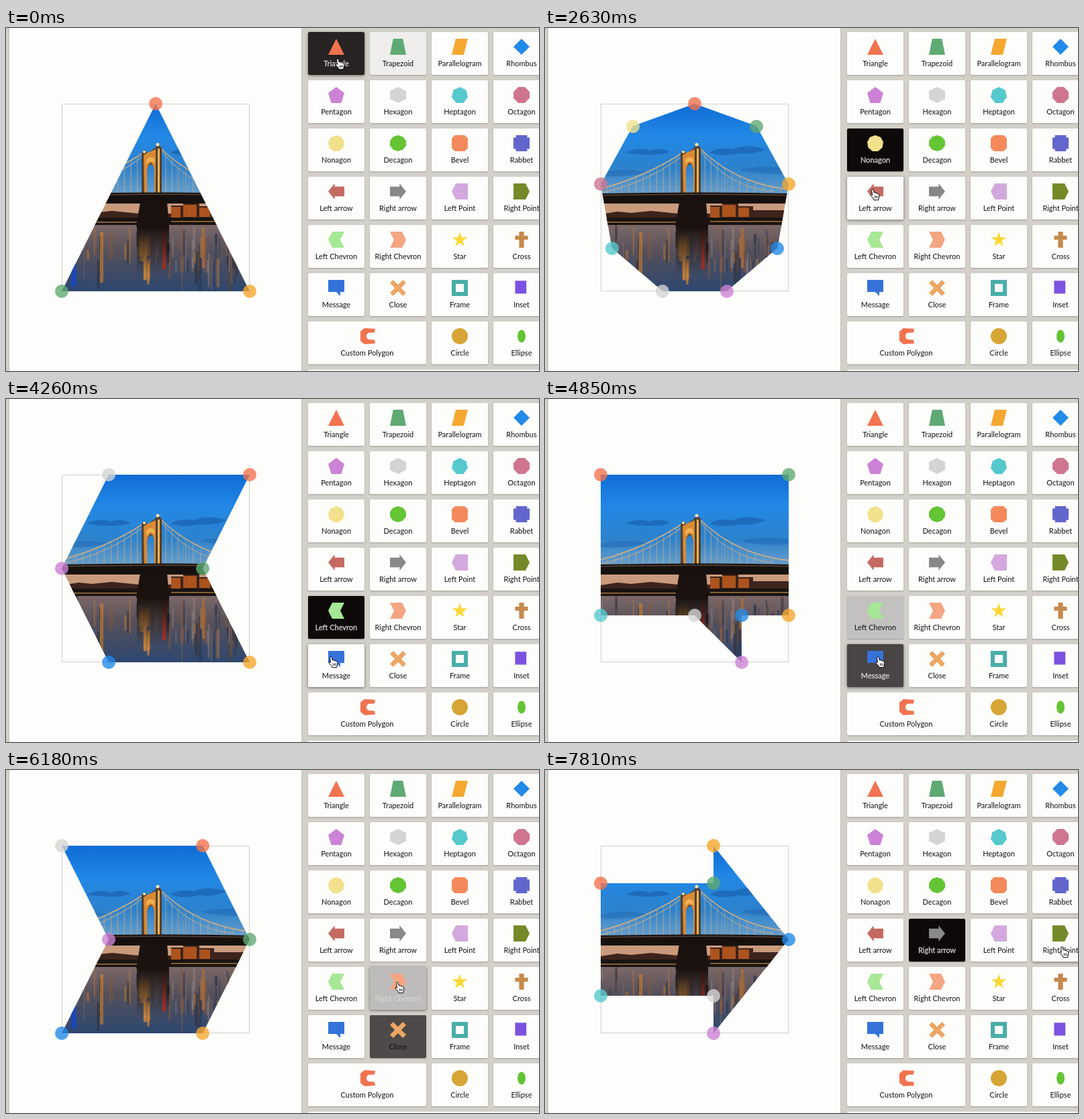
An HTML page for the animation above (8 s loop, 794x512 px).

```html
<!DOCTYPE html>
<html lang="en">
<head>
<meta charset="utf-8">
<title>Shape picker</title>
<style>
  html, body { margin: 0; width: 100%; height: 100%; overflow: hidden; background: #d3d0c9; }
  body { position: relative; font: 11px/16px Lato, "Open Sans", sans-serif; color: #111; }
  body > * { position: absolute; box-sizing: border-box; }
  #panel { left: 5px; top: 0; width: 435px; height: 100%; background: #fdfdfb; box-shadow: 0 0 2px rgba(0,0,0,.2); }
  #frame { left: 83px; top: 113px; width: 280px; height: 280px; border: 1px solid #d0d0c9; }
  #photo { left: 83px; top: 113px; width: 280px; height: 280px; }
  .handle { width: 20px; height: 20px; margin: -10px; border-radius: 50%; opacity: .8; }
  .card { width: 84px; height: 64px; border-radius: 2px; text-align: center; background: #fdfdfc; box-shadow: 0 1px 2px rgba(0,0,0,.25); }
  .card.hover { box-shadow: 0 1px 4px rgba(0,0,0,.5); }
  .card.on { color: #d6d2d0; -webkit-text-stroke: .3px #d6d2d0; }
  .card i { display: block; width: 24px; height: 24px; margin: 10px auto 5px; }
  #hand { width: 15px; height: 18px; margin: -9px 0 0 -7px; }
</style>
</head>
<body>
<div id="panel"></div>
<div id="frame"></div>
<svg id="photo" viewBox="83 113 280 280">
  <defs>
    <linearGradient id="sky" x2="0" y2="1">
      <stop stop-color="#0f6cd4"/><stop offset=".35" stop-color="#2288e6"/>
      <stop offset=".7" stop-color="#2c82cc"/><stop offset="1" stop-color="#6a9fca"/>
    </linearGradient>
    <linearGradient id="water" x2="0" y2="1">
      <stop stop-color="#7c6868"/><stop offset=".4" stop-color="#55505a"/><stop offset="1" stop-color="#2d4770"/>
    </linearGradient>
    <linearGradient id="shade" x2="0" y2="1">
      <stop stop-color="#17110f"/><stop offset="1" stop-color="#17110f" stop-opacity="0"/>
    </linearGradient>
  </defs>
  <path fill="url(#sky)" d="M83 113h280v137H83z"/>
  <g fill="#1b62ae" opacity=".7">
    <path d="M120 186q20-9 36-3 16-6 30 2-20 8-66 1zM245 186q14-9 34-5 22-9 50 0-20 9-40 6-25 6-44-1z"/>
    <path d="M83 216q30-8 70-1-30 9-70 6zM290 212q30-8 73-3v8q-40 3-73-5z" opacity=".6"/>
  </g>
  <path fill="#c99a7c" d="M83 258h280v26H83z"/>
  <path fill="#3c241c" d="M83 278l25-4 20 2 30-3 40 4h48v-12h18v-3h24v4h22v6h53v24H83z"/>
  <path fill="#c8601f" d="M246 267h14v16h-14zM264 264h20v18h-20zM288 268h16v14h-16z" opacity=".8"/>
  <path fill="#1a1412" d="M83 283h280v11H83z"/>
  <path fill="#e0a050" d="M83 289h112v1.5H83zM246 288h117v1.5H246z" opacity=".7"/>
  <path fill="url(#water)" d="M83 294h280v99H83z"/>
  <g id="streaks"></g>
  <path fill="url(#shade)" d="M195 294h48v75h-48z"/>
  <g id="cables" fill="none" stroke="#e0b27c"></g>
  <path fill="#54402f" d="M202 187l4-5 5 5 11-8 4-6 6 6v72h-11v-40q-4-16-11 0v40h-8z"/>
  <path fill="#d98a34" d="M205 190l4-3 14-6v68h-2v-38q-5-20-11 0v38h-4z"/>
  <path fill="#f0b252" d="M209 197q6-8 12-1v6q-6-7-12 2zM226 180h3v66h-3z"/>
  <g fill="#ffe6a8"><circle cx="206" cy="185" r="2"/><circle cx="226" cy="174" r="2.5"/></g>
  <path fill="#16110f" d="M83 247q140-3 280 0v15H83z"/>
  <path fill="#5c4436" d="M83 249q140-3 280 0v1.5q-140-3-280 0z"/>
  <path fill="#1b1210" d="M200 260h40l3 36-6 4h-36l-7-4z"/>
</svg>
<svg id="hand" viewBox="0 0 15 18">
  <path fill="#fff" stroke="#000" stroke-linejoin="round" d="M3.5 9.5L2.6 2.6Q2.7.8 4 .8 5.2.8 5.5 2.4L6.3 6Q7 5 8.2 5.5 8.9 5.8 9 6.6 10 5.8 11 6.6 11.5 7 11.6 7.6 13 7 13.6 8.4 14.2 11 13.4 13L12.6 16.8H6Q5.6 14.8 3.6 13 1.6 11 .8 9.4.8 8 2 8.2z"/>
  <path fill="none" stroke="#000" stroke-width=".8" d="M7.3 10.5v3.6M9.2 10.5v3.6M11.1 10.5v3.6"/>
</svg>
<script>
const $ = id => document.getElementById(id);
const hand = $('hand'), photo = $('photo');

// Shapes are lists of [x, y] in percent of their box.
const pts = s => s.split(',').map(p => p.split(' ').map(Number));
const regular = n => Array.from({ length: n }, (_, i) => {
  const a = i / n * 2 * Math.PI, at = k => k / n * 2 * Math.PI;
  const wide = Math.max(...Array.from({ length: n }, (_, k) => Math.sin(at(k))));
  const low = Math.cos(at(Math.floor(n / 2)));
  return [50 + 50 * Math.sin(a) / wide, 100 * (1 - Math.cos(a)) / (1 - low)].map(Math.round);
});
const spin = s => {
  const out = [];
  let quarter = pts(s);
  for (let i = 0; i < 4; i++) {
    out.push(...quarter);
    quarter = quarter.map(([x, y]) => [y, 100 - x]);
  }
  return out;
};
const fold = (s, axis) => {
  const half = pts(s);
  const rest = half.filter(p => p[axis] !== 50).reverse();
  return half.concat(rest.map(p => p.map((v, i) => i === axis ? 100 - v : v)));
};

const items = [
  ['Triangle', '#f27350', fold('50 0,0 100', 0)],
  ['Trapezoid', '#5fa973', fold('20 0,0 100', 0)],
  ['Parallelogram', '#f5a830', pts('25 0,100 0,75 100,0 100')],
  ['Rhombus', '#228ae9', spin('50 0')],
  ['Pentagon', '#cc82d6', regular(5)],
  ['Hexagon', '#d4d4d4', regular(6)],
  ['Heptagon', '#55c9ce', regular(7)],
  ['Octagon', '#cf7590', spin('70 0,30 0')],
  ['Nonagon', '#f2e18c', regular(9)],
  ['Decagon', '#63c434', regular(10)],
  ['Bevel', '#f48a5b', spin('80 0,20 0')],
  ['Rabbet', '#6266cc', spin('85 0,15 0,15 15')],
  ['Left arrow', '#c46a62', pts('40 0,40 20,100 20,100 80,40 80,40 100,0 50')],
  ['Right arrow', '#888886', fold('0 20,60 20,60 0,100 50', 1)],
  ['Left Point', '#d3a8de', fold('0 50,25 0,100 0', 1)],
  ['Right Point', '#748a28', fold('0 0,75 0,100 50', 1)],
  ['Left Chevron', '#a6e895', pts('100 0,75 50,100 100,25 100,0 50,25 0')],
  ['Right Chevron', '#f4a582', pts('75 0,100 50,75 100,0 100,25 50,0 0')],
  ['Star', '#fdd835', fold('50 0,39 35,2 35,32 57,21 91,50 70', 0)],
  ['Cross', '#c68a4c', fold('35 0,35 25,10 25,10 50,35 50,35 100', 0)],
  ['Message', '#3573d8', pts('0 0,100 0,100 75,75 75,75 100,50 75,0 75')],
  ['Close', '#eca664', spin('20 0,0 20,30 50')],
  ['Frame', '#4aaea8', pts('0 0,0 100,25 100,25 25,75 25,75 75,25 75,25 100,100 100,100 0')],
  ['Inset', '#7c52e0', 'inset(5% 20% 15% 10%)'],
  ['Custom Polygon', '#f27350', fold('8 21,33 0,100 4,96 27,58 29,46 42', 1)],
  ['Circle', '#d6a535', 'circle(50%)'],
  ['Ellipse', '#63c434', 'ellipse(25% 40%)'],
  ['', 'none', 'none']
];
const clip = s => typeof s === 'string' ? s : `polygon(${s.map(([x, y]) => `${x}% ${y}%`)})`;

function add(cls, left, top) {
  const el = document.createElement('div');
  el.className = cls;
  el.style.left = left + 'px';
  el.style.top = top + 'px';
  document.body.insertBefore(el, hand);
  return el;
}

const cards = items.map(([name, color, shape], i) => {
  const slot = i > 24 ? i + 1 : i;
  const x = 450 + slot % 4 * 92, y = 6 + Math.floor(slot / 4) * 72;
  const el = add('card', x, y);
  const w = i === 24 ? 176 : i === 27 ? 360 : 84;
  el.style.width = w + 'px';
  el.innerHTML = `<i style="background:${color};clip-path:${clip(shape)}"></i>${name}`;
  return { el, x, y, w };
});
const handles = items.slice(0, 12).map(item => {
  const el = add('handle', 0, 0);
  el.style.background = item[1];
  return el;
});

// Bridge cables with hangers, then lights mirrored in the water.
function cable(x0, y0, cx, cy, x1, y1, alpha) {
  let d = `M${x0} ${y0}Q${cx} ${cy} ${x1} ${y1}`, hang = '';
  for (let u = .08; u < 1; u += .085) {
    const v = 1 - u, at = (a, b, c) => v * v * a + 2 * u * v * b + u * u * c;
    hang += `M${at(x0, cx, x1)} ${at(y0, cy, y1)}V247`;
  }
  return `<g opacity="${alpha}"><path stroke-width="1.6" d="${d}"/><path stroke-width=".8" opacity=".7" d="${hang}"/></g>`;
}
$('cables').innerHTML = cable(205, 186, 150, 222, 83, 240, .9) + cable(203, 192, 150, 232, 83, 246, .5)
  + cable(229, 178, 282, 232, 363, 241, .9) + cable(232, 184, 275, 238, 340, 244, .5);

let seed = 7;
const rnd = () => (seed = seed * 16807 % 2147483647) / 2147483647;
const streak = (x, y, w, h, color, alpha) =>
  `<rect x="${x}" y="${y}" width="${w}" height="${h}" fill="${color}" opacity="${alpha}"/>`;
const tones = ['#c07a38', '#2b2423', '#8a5a3c', '#24304a', '#9a8580'];
let lights = '';
for (let i = 0; i < 90; i++)
  lights += streak(83 + rnd() * 280, 294 + rnd() * 55, 1 + rnd() * 4, 12 + rnd() * 45, tones[i % 5], .45);
for (let i = 0; i < 14; i++)
  lights += streak(198 + rnd() * 14, 305 + rnd() * 50, 2 + rnd() * 4, 30, '#d88a30', .5);
lights += streak(233, 300, 5, 60, '#d8281c', .8) + streak(97, 352, 8, 34, '#1648c8', .8)
  + streak(140, 305, 5, 75, '#cf8434', .6) + streak(292, 298, 4, 60, '#c87a30', .6);
$('streaks').innerHTML = lights;

// Each cue: chosen card, fade already done (ms), then the pointer's steps to its next stop.
const STEP = 146, FADE = 300, LOOP = 8000;
const cues = [
  { t: 0, card: 0, lead: 282, n: 1, to: [497, 54] },
  { t: 424, card: 0, lead: 300, n: 4, to: [498, 109], via: [610, 70] },
  { t: 1300, card: 4, lead: 180, n: 4, to: [492, 180] },
  { t: 2180, card: 8, lead: 80, n: 3, to: [491, 249] },
  { t: 2920, card: 12, lead: 80, n: 3, to: [489, 322] },
  { t: 3810, card: 16, lead: 80, n: 3, to: [487, 393] },
  { t: 4560, card: 20, lead: 80, n: 4, to: [564, 396] },
  { t: 5450, card: 21, lead: 0, n: 3, to: [586, 325] },
  { t: 6180, card: 17, lead: 80, n: 3, to: [597, 268] },
  { t: 6920, card: 13, lead: 80, n: 6, to: [773, 272], via: [720, 640] }
];

function showShape(shape) {
  photo.style.clipPath = clip(shape);
  handles.forEach((el, i) => {
    const p = shape[i];
    el.style.display = p ? '' : 'none';
    if (!p) return;
    el.style.left = 83 + p[0] * 2.8 + 'px';
    el.style.top = 113 + p[1] * 2.8 + 'px';
  });
}

function draw(now) {
  const t = now % LOOP;
  const at = cues.findLastIndex(c => c.t <= t);
  const cue = cues[at], from = at ? cues[at - 1].to : cue.to;
  const last = at ? cues[at - 1].card : 1;
  const k = Math.floor((t - cue.t) / STEP);
  const p = Math.min(1, (k * STEP + cue.lead) / FADE);

  const f = Math.min(1, k / cue.n), u = f * f * (3 - 2 * f), v = 1 - u;
  const [x, y] = from.map((a, i) => {
    const b = cue.to[i], c = cue.via ? cue.via[i] : (a + b) / 2;
    return v * v * a + 2 * u * v * c + u * u * b;
  });
  hand.style.left = x + 'px';
  hand.style.top = y + 'px';

  cards.forEach((c, i) => {
    const dark = i === cue.card ? p * (i ? 1 : .95) : i === last ? 1 - p : 0;
    c.el.style.background = `rgb(${253 - 240 * dark},${253 - 244 * dark},${252 - 244 * dark})`;
    c.el.classList.toggle('on', i === cue.card);
    c.el.classList.toggle('hover', x >= c.x && x < c.x + c.w && y >= c.y && y < c.y + 64);
  });
  showShape(items[cue.card][2]);
}

const start = performance.now();
function tick() {
  draw(performance.now() - start);
  requestAnimationFrame(tick);
}
tick();
</script>
</body>
</html>
```
